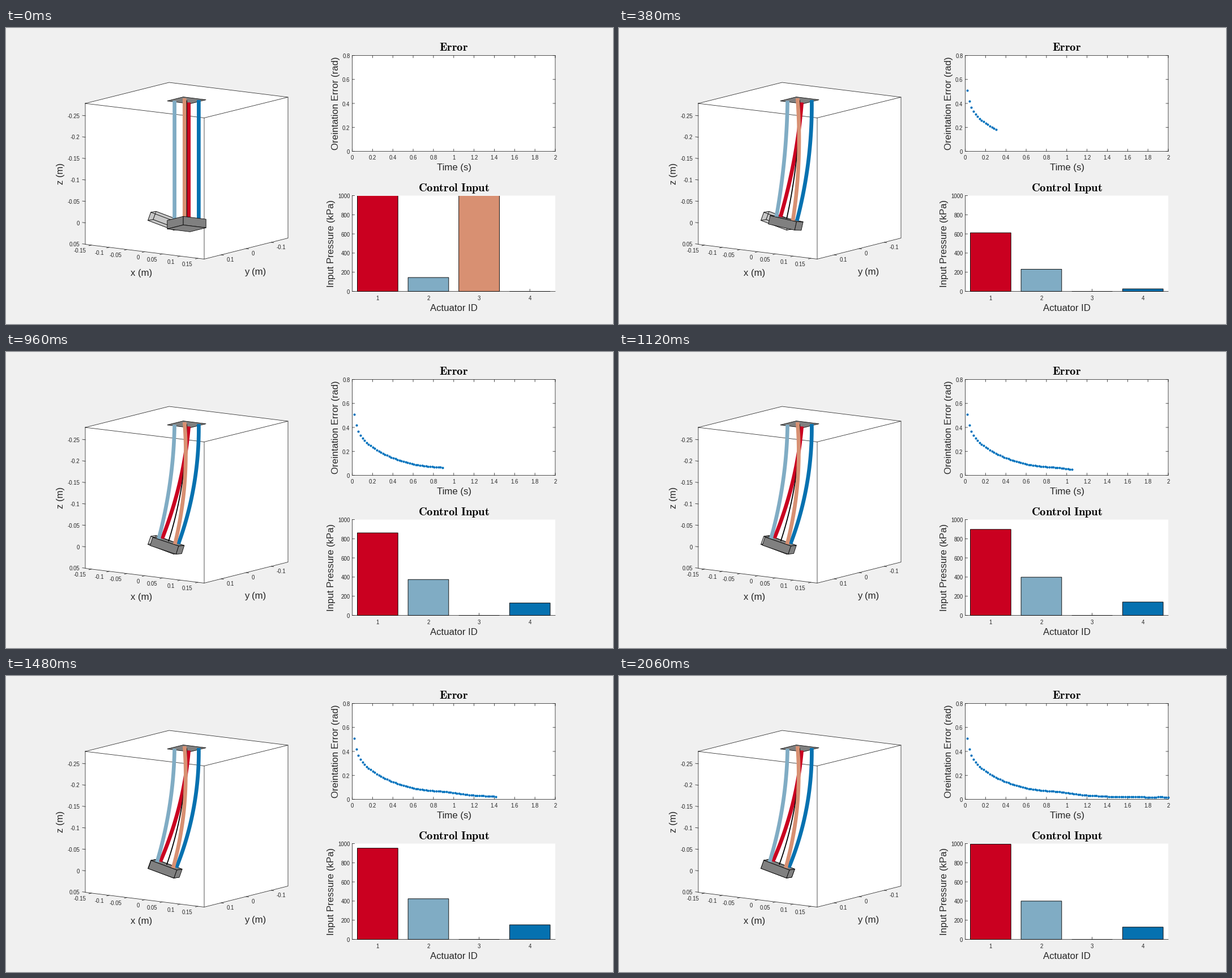
A matplotlib script for the animation above (2080 ms loop, 1072 px wide and 522 px high).

```python
import matplotlib.pyplot as plt
import numpy as np
from matplotlib.animation import FuncAnimation
from matplotlib.patches import Polygon, Rectangle

plt.rcParams["font.family"] = "Liberation Sans"
plt.rcParams["mathtext.fontset"] = "cm"
plt.rcParams["path.snap"] = False

W, H, DPI = 1072, 522, 100
PX = 72 / DPI
HOLD, FRAMES, STEP_MS = 4, 104, 20
STEPS = FRAMES - HOLD - 1
INK = "#262626"
RED, LIGHT, SALMON, BLUE = "#ca0020", "#80acc4", "#d89072", "#0571b0"

# Orthographic view: axes are (right, away, down)
SCALE, AZ, EL = 767, np.radians(35.2), np.radians(10.15)
LENGTH, HALF, RADIUS, THICK = 0.279, 0.032, 0.02, 0.02
SQUARE = ((-1, -1), (1, -1), (1, 1), (-1, 1))


# ---- Controller response -----------------------------------------------

def seconds(n):
    return 2 * n / STEPS


def error(n):
    """Orientation error: quick first drop, slow decay, late ripple."""
    t = seconds(n)
    decay = 0.37 * np.exp(-2.6 * t) + 0.29 * 0.5 ** n + 0.015
    bump = 0.014 * np.exp(-((t - 0.92) / 0.2) ** 2)
    ripple = 0.003 * (t / 2) ** 4 * np.cos(10 * np.pi * (t - 1.92))
    return decay + bump + ripple


def pressures(n):
    t, kick = seconds(n), 0.5 ** n
    sag = 30 * (t / 2) ** 20
    return np.clip([1020 - 665 * np.exp(-1.61 * t) + 645 * kick,
                    430 - 235 * np.exp(-(t / 0.74) ** 2) - 50 * kick - sag,
                    1200 * kick - 200,
                    160 - 285 * np.exp(-2.5 * t) - sag], 0, 1000)


def pose(n):
    """Lean left, lean away, twist (deg) and contraction (px)."""
    if n == 0:
        return 0, 0, 0, 0
    e = error(n)
    return (0.347 - 0.72 * e, 0.262 - 0.25 * e,
            46.3 - 21 * e - 40 * e ** 3, 4 - 7 * e)


# ---- Drawing helpers ---------------------------------------------------

fig = plt.figure(figsize=(W / DPI, H / DPI), dpi=DPI, facecolor="#f0f0f0")
ax = fig.add_axes([0, 0, 1, 1])
ax.set_xlim(0, W)
ax.set_ylim(H, 0)
ax.axis("off")


def line(xs, ys, color=INK, width=0.8, z=2, **kw):
    return ax.plot(xs, ys, color=color, lw=width * PX, zorder=z, **kw)[0]


def text(x, y, s, size=9.6, ha="center", color=INK, rot=0):
    va = "center" if rot else "center_baseline"
    ax.text(x, y, s, fontsize=size * PX, ha=ha, va=va, color=color, rotation=rot)


def poly(points, face, z, edge="black", width=0.8, **kw):
    return ax.add_patch(Polygon(points, closed=True, fc=face, ec=edge,
                                lw=width * PX, zorder=z, **kw))


# ---- Arm geometry ------------------------------------------------------

def project(p):
    p = np.asarray(p)
    x = 319 + SCALE * p[..., 0]
    y = 338.25 + SCALE * (np.cos(EL) * p[..., 2] + np.sin(EL) * p[..., 1])
    return np.stack([x, y], axis=-1)


def toward(v):
    return np.sin(EL) * v[2] - np.cos(EL) * v[1]


def spin(x, y, angle):
    return np.array([x * np.cos(angle) - y * np.sin(angle),
                     x * np.sin(angle) + y * np.cos(angle)])


class Arm:
    """Constant-curvature arm with an even twist along its length."""

    def __init__(self, n):
        left, away, twist, shrink = pose(n)
        lean = max(np.hypot(left, away), 1e-6)
        self.dir = np.array([-left, away]) / lean
        self.theta = np.arcsin(lean)
        self.twist = np.radians(twist)
        self.length = LENGTH - shrink / SCALE

    def rotate(self, x, y, z, s):
        """Turn a section-fixed vector into space at arc fraction s."""
        flat = spin(x, y, AZ + self.twist * s)
        along = self.dir @ flat
        a = self.theta * s
        shift = along * (np.cos(a) - 1) + z * np.sin(a)
        return np.array([flat[0] + shift * self.dir[0],
                         flat[1] + shift * self.dir[1],
                         z * np.cos(a) - along * np.sin(a)])

    def point(self, x, y, z, s):
        a = self.theta * s
        out = self.length * (1 - np.cos(a)) / self.theta
        down = self.length * np.sin(a) / self.theta - LENGTH
        return self.rotate(x, y, z, s) + np.array(
            [out * self.dir[0], out * self.dir[1], down])

    def strand(self, x, y):
        return np.array([project(self.point(x, y, 0, s))
                         for s in np.linspace(0, 1, 32)])

    def faces(self):
        """Corners of the six end-block faces and whether each faces us."""
        out = []
        for axis in range(3):
            for side in (-1, 1):
                ring = []
                for uv in SQUARE:
                    c = np.insert(np.array(uv, float), axis, side)
                    ring.append(project(self.point(
                        c[0] * HALF, c[1] * HALF, (c[2] + 1) / 2 * THICK, 1)))
                normal = np.zeros(3)
                normal[axis] = side
                out.append((np.array(ring),
                            toward(self.rotate(*normal, 1)) > 0))
        return out


# ---- 3D box ------------------------------------------------------------

A, B, C, D = (140, 133), (288, 96), (498, 122), (350, 158.5)
E, F, G = (140, 381.5), (350, 407.5), (498, 370.5)
poly([A, B, C, G, F, E], "white", 1, edge="none")
for path in ([A, B, C, D, A], [A, E, F, G, C], [D, F]):
    line(*zip(*path))

for i in range(7):
    v = -0.15 + 0.05 * i
    x, y = 245 + 627 * v, 394.5 + 77.6 * v
    line([x, x - 4.5], [y, y + 1.1])
    text(x - 9.5, y + 9.5, f"{round(v, 2) + 0:g}", ha="right")
    z = -0.25 + 0.05 * i
    y = 343.5 + 755 * z
    line([140, 135], [y, y - 0.6])
    text(130, y, f"{round(z, 2) + 0:g}", ha="right")
for v in (0.1, 0, -0.1):
    x, y = 424 - 442 * v, 389 + 110.4 * v
    line([x, x + 4.5], [y, y + 0.6])
    text(x + 9.5, y + 7.7, f"{v:g}", ha="left")
text(239, 431.2, "x (m)", 16.7)
text(440.5, 428.5, "y (m)", 16.7)
text(97, 257, "z (m)", 16.7, rot=90)

# ---- Error plot --------------------------------------------------------

X0, X1 = 611.5, 970
ax.add_patch(Rectangle((X0, 48.5), X1 - X0, 169, fc="white", ec=INK,
                       lw=0.8 * PX, zorder=1))
for i in range(11):
    x = X0 + i * (X1 - X0) / 10
    line([x, x], [217.5, 213.5])
    line([x, x], [48.5, 52.5])
    text(x, 228.3, f"{0.2 * i:g}")
for i in range(5):
    y = 217.5 - 42.25 * i
    line([X0, X0 + 4], [y, y])
    line([X1, X1 - 4], [y, y])
    text(607.5, y + 0.5, f"{0.2 * i:g}", ha="right")
text(791, 32.2, r"$\mathbf{Error}$", 20.5, color="black")
text(791.5, 245.4, "Time (s)", 16.7)
text(582, 133, "Oreintation Error (rad)", 16.7, rot=90)

steps = np.arange(1, STEPS + 1)
dot_x = X0 + (X1 - X0) * seconds(steps) / 2
dot_y = 217.5 - 211.25 * error(steps)
dots = line([], [], "#0072bd", z=5, ls="none", marker="o",
            ms=4.1 * PX, mew=0)

# ---- Control input plot ------------------------------------------------

BASE, TOP = 464.5, 295.5
ax.add_patch(Rectangle((X0, TOP), X1 - X0, BASE - TOP, fc="white",
                       ec="none", zorder=1))
line([X0, X0, X1], [TOP, BASE, BASE])
for i in range(6):
    y = BASE - 33.8 * i
    line([X0, X0 + 4], [y, y])
    text(607.5, y + 0.5, f"{200 * i}", ha="right")
clip = Rectangle((X0, TOP + 0.4), X1 - X0, 171, transform=ax.transData)
PITCH = (X1 - X0) / 4
bars = []
for i, color in enumerate((RED, LIGHT, SALMON, BLUE)):
    x = X0 + PITCH * (i + 0.5)
    line([x, x], [BASE, BASE - 4])
    text(x, 475.5, f"{i + 1}")
    bar = ax.add_patch(Rectangle((x - 0.4 * PITCH, BASE), 0.8 * PITCH, 0,
                                 fc=color, ec="black", lw=0.9 * PX, zorder=4))
    bar.set_clip_path(clip)
    bars.append(bar)
text(791, 279.8, r"$\mathbf{Control\ Input}$", 20.5, color="black")
text(791, 493, "Actuator ID", 16.7)
text(574.5, 380, "Input Pressure (kPa)", 16.7, rot=90)

# ---- Arm artists -------------------------------------------------------

rest = Arm(0)
poly([project(rest.point(u * HALF, v * HALF, 0, 0)) for u, v in SQUARE],
     "#808080", 3)
for ring, _ in Arm(STEPS).faces():
    poly(ring, (0.5, 0.5, 0.5, 0.25), 4, edge=(0, 0, 0, 0.85), width=0.7)

block = [poly(np.zeros((4, 2)), "#808080", 5, joinstyle="round")
         for _ in range(6)]
# Far to near: colour, section offset, width
STRANDS = [(RED, 1, 1, 6.7), (BLUE, 1, -1, 6.7), ("black", 0, 0, 1.8),
           (SALMON, -1, -1, 6.7), (LIGHT, -1, 1, 6.7)]
strands = [line([], [], c, w, z=6 + 0.1 * i, solid_capstyle="butt")
           for i, (c, _, _, w) in enumerate(STRANDS)]


def update(frame):
    n = max(0, frame - HOLD)
    arm = Arm(n)
    for artist, (_, u, v, _) in zip(strands, STRANDS):
        artist.set_data(*arm.strand(u * RADIUS, v * RADIUS).T)
    # The block hides the strand ends while we look at it from below
    below = toward(arm.rotate(0, 0, 1, 1)) > 0
    for patch, (ring, seen) in zip(block, arm.faces()):
        patch.set_xy(ring)
        patch.set_visible(bool(seen))
        patch.set_zorder(8 if below else 5)
    dots.set_data(dot_x[:n], dot_y[:n])
    for bar, value in zip(bars, pressures(n)):
        h = value * (BASE - TOP) / 1000
        bar.set_y(BASE - h)
        bar.set_height(h)
    return [*strands, *block, dots, *bars]


anim = FuncAnimation(fig, update, frames=FRAMES, interval=STEP_MS,
                     init_func=lambda: update(0), repeat=True,
                     repeat_delay=0, blit=False)
plt.show()
```
